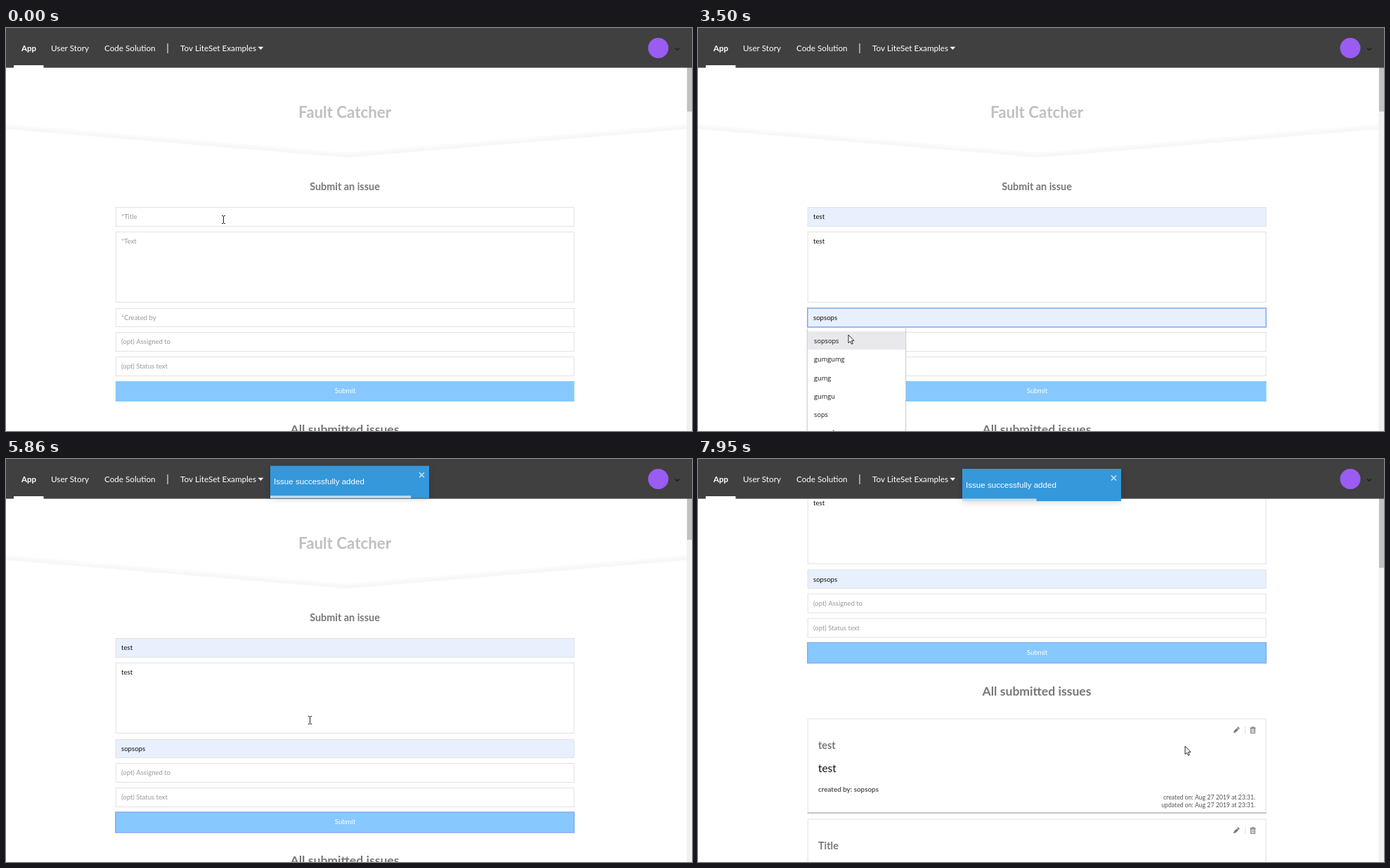
Recreate the animation shown at these times as an HTML page with a canvas. Size 976 by 574 pixels, loop 8 s.

```html
<!DOCTYPE html>
<html lang="en">
<head>
<meta charset="utf-8">
<title>Submit an issue</title>
<style>
  html, body { margin: 0; width: 100%; height: 100%; overflow: hidden; background: #fff; }
  canvas { display: block; width: 976px; height: 574px; }
</style>
</head>
<body>
<canvas id="stage" width="976" height="574"></canvas>
<script>
const ctx = document.getElementById('stage').getContext('2d');
const LOOP = 8000, W = 976, H = 574;
const LATO = 'Lato, sans-serif', OPEN = '"Open Sans", sans-serif', ARIAL = '"Liberation Sans", Arial, sans-serif';
const LEFT = 155.8, WIDTH = 652.8, MID = 482;
const USER = 'sopsops';

const FIELDS = {
  title:    { y: 255, h: 28,  hint: '*Title' },
  text:     { y: 290, h: 101, hint: '*Text' },
  created:  { y: 399, h: 27,  hint: '*Created by' },
  assigned: { y: 433, h: 28,  hint: '(opt) Assigned to' },
  status:   { y: 468, h: 28,  hint: '(opt) Status text' }
};

const MENUS = {
  title:   { open: 390,  hover: 620,  close: 1000, items: ['test', 'Title', 'gumg', 'gumgu', 'sops', 'gumsop'] },
  created: { open: 2700, hover: 3340, close: 3730, items: [USER, 'gumgumg', 'gumg', 'gumgu', 'sops', 'sopsofs'] }
};

const FOCUS = [[310, 'title'], [1400, 'text'], [2550, 'created'], [4450, 'submit']];
const KEYS = [1610, 1690, 1840, 1920];
const TOAST_AT = 5288;

// time, x, y
const POINTER = [
  [70, 309, 273], [310, 262, 271], [460, 258, 271], [780, 222, 304], [1229, 222, 304],
  [1230, 238, 317], [1400, 236, 322], [1840, 238, 325], [2390, 240, 402], [2560, 240, 411],
  [2800, 238, 412], [3300, 215, 438], [3500, 214, 437], [3730, 214, 437], [4120, 262, 470],
  [4420, 424, 514], [4620, 424, 512], [4840, 401.5, 465.5], [4990, 430, 382],
  [5140, 432, 372], [7250, 432, 372], [7480, 520, 400], [7720, 648, 424], [7950, 693, 409]
];
const SCROLL = [[6410, 0], [6480, 12], [6560, 47.7], [6790, 193], [6870, 229], [6940, 241.4]];
const BOUNCE = [[0, -2143], [450, 17.9], [562, -7.1], [675, 3.6], [750, 0]];

const linear = p => p;
const easeOut = p => 1 - (1 - p) ** 3;

// Value of one column of a key list at time t
function track(keys, t, col = 1, ease = linear) {
  if (t <= keys[0][0]) return keys[0][col];
  for (let i = 1; i < keys.length; i++) {
    const a = keys[i - 1], b = keys[i];
    if (t < b[0]) return a[col] + (b[col] - a[col]) * ease((t - a[0]) / (b[0] - a[0]));
  }
  return keys[keys.length - 1][col];
}

function box(x, y, w, h, fill) {
  ctx.fillStyle = fill;
  ctx.fillRect(x, y, w, h);
}

function frame(x, y, w, h, color, line = 1) {
  ctx.strokeStyle = color;
  ctx.lineWidth = line;
  ctx.strokeRect(x + line / 2, y + line / 2, w - line, h - line);
}

function shape(points, fill) {
  ctx.beginPath();
  points.forEach(([x, y]) => ctx.lineTo(x, y));
  ctx.closePath();
  ctx.fillStyle = fill;
  ctx.fill();
}

function label(str, x, y, size, color, { weight = 400, family = LATO, align = 'left' } = {}) {
  ctx.font = `${weight} ${size}px ${family}`;
  ctx.fillStyle = color;
  ctx.textAlign = align;
  ctx.fillText(str, x, y);
  return ctx.measureText(str).width;
}

function stateAt(t) {
  const s = { t, scroll: track(SCROLL, t), focus: null, menu: null, values: {} };
  for (const [at, name] of FOCUS) if (t >= at) s.focus = name;
  for (const name in MENUS) {
    const m = MENUS[name];
    if (t >= m.open && t < m.close) s.menu = name;
    if (t >= m.hover) s.values[name] = m.items[0];
  }
  s.values.text = 'test'.slice(0, KEYS.filter(k => t >= k).length);
  return s;
}

function focusRing(y, h) {
  frame(LEFT - 0.8, y - 0.8, WIDTH + 1.2, h + 1.6, '#86b0f3', 1.6);
}

function caretOn(s, name) {
  if (s.focus !== name || s.menu) return false;
  if (name === 'title') return s.t >= 1000;
  return name === 'text' && (s.t < 1920 || Math.floor((s.t - 1920) / 530) % 2 === 0);
}

function drawField(s, name) {
  const { y, h, hint } = FIELDS[name], value = s.values[name];
  const base = y + 17.4;
  box(LEFT, y, WIDTH, h, value && name !== 'text' ? '#e8f0fe' : '#fff');
  frame(LEFT, y, WIDTH, h, '#e2e2e2');
  if (s.focus === name) focusRing(y, h);
  const w = value ? label(value, 164, base, 9.6, '#111') : 0;
  if (!value) label(hint, 164, base, 9.5, '#999');
  if (caretOn(s, name)) box(Math.round(164 + w), y + 8, 1, 12, '#000');
}

// Soft grey band that darkens towards a V-shaped edge
function drawChevron() {
  ctx.lineWidth = 1;
  for (let d = -8; d <= 1; d++) {
    const a = d <= 0 ? 0.04 * (d + 9) / 9 : 0.015;
    ctx.strokeStyle = `rgba(0,0,0,${a})`;
    ctx.beginPath();
    ctx.moveTo(0, 143 + d);
    ctx.lineTo(484.5, 183.5 + d);
    ctx.lineTo(969, 143 + d);
    ctx.stroke();
  }
}

function drawIcons(y) {
  const grey = '#777';
  ctx.save();
  ctx.translate(766, y);
  ctx.rotate(-Math.PI / 4);
  box(-3.2, -1.6, 5.8, 3.2, grey);
  box(3.2, -1.6, 1.9, 3.2, grey);
  shape([[-3.2, -1.6], [-3.2, 1.6], [-5.8, 0]], grey);
  ctx.restore();

  box(778, y - 5, 1, 10, '#e2e2e2');

  box(785.2, y - 3.6, 8.4, 1.1, grey);
  box(787.6, y - 4.8, 3.6, 1.2, grey);
  frame(786, y - 2.8, 6.8, 7.6, grey, 1.1);
  box(788, y - 1, 0.8, 4, grey);
  box(790.1, y - 1, 0.8, 4, grey);
}

function drawCard(y, title, text) {
  box(LEFT, y, WIDTH, 135, '#fff');
  frame(LEFT, y, WIDTH, 135, '#e2e2e2');
  box(LEFT, y + 134, WIDTH, 1, '#999');
  drawIcons(y + 16.5);
  label(title, 171, y + 43.5, 14.4, '#777', { weight: 700 });
  label(text, 171, y + 76, 15.4, '#111');
  label('created by: ' + USER, 171, y + 104, 9.8, '#555', { weight: 700 });
  ['created', 'updated'].forEach((verb, i) =>
    label(verb + ' on: Aug 27 2019 at 23:31.', 793, y + 115 + 11 * i, 8.7, '#555', { align: 'right' }));
}

function drawMenu(name, hovered) {
  const f = FIELDS[name], items = MENUS[name].items, row = 26.1;
  const top = f.y + f.h + 2, h = row * items.length + 8;
  ctx.save();
  ctx.shadowColor = 'rgba(0,0,0,.22)';
  ctx.shadowBlur = 3;
  ctx.shadowOffsetY = 1;
  box(156, top, 139, h, '#fff');
  ctx.restore();
  box(155, top, 1, h, '#d2d2d2');
  box(295, top, 1, h, '#d2d2d2');
  items.forEach((item, i) => {
    const y = top + 4 + row * i;
    if (i === 0 && hovered) box(156, y, 139, row, '#e9e9ed');
    label(item, 165, y + 17.3, 9.2, '#111', { family: OPEN });
  });
}

function drawPage(s) {
  ctx.save();
  ctx.translate(0, -s.scroll);
  drawChevron();
  const centred = { weight: 700, align: 'center' };
  label('Fault Catcher', MID, 127.5, 22.3, '#c0c0c0', centred);
  label('Submit an issue', MID, 230.5, 14.4, '#777', centred);
  for (const name in FIELDS) drawField(s, name);

  box(LEFT, 503, WIDTH, 29, '#87c9ff');
  if (s.focus === 'submit') focusRing(503, 29);
  label('Submit', 482.5, 520.4, 9.6, '#fff', { align: 'center' });

  label('All submitted issues', MID, 578, 17.6, '#777', centred);
  drawCard(611, 'test', 'test');
  drawCard(754, 'Title', 'Text');

  if (s.menu) drawMenu(s.menu, s.t >= MENUS[s.menu].hover);
  ctx.restore();
}

function drawScrollbar(s) {
  box(968.4, 56, 7.6, H - 56, '#f1f1f1');
  const end = s.t < 5310 ? 119 : 115 + s.scroll * 0.1655;
  box(969, 56, 7, end - 56, '#c1c1c1');
}

function drawHeader() {
  box(0, 0, W, 56.6, '#404040');
  box(11, 53, 42.5, 4, '#fff');
  label('App', 22, 32.7, 11.5, '#fff', { weight: 700 });
  label('User Story', 64, 32.7, 11.7, '#fff');
  label('Code Solution', 140, 32.7, 11.7, '#fff');
  box(229.5, 22, 1, 14, '#fff');
  label('Tov LiteSet Examples', 248, 32.7, 11.7, '#fff');
  shape([[358.5, 26.7], [366.2, 26.7], [362.4, 31]], '#fff');

  ctx.beginPath();
  ctx.arc(928, 28.5, 14.5, 0, Math.PI * 2);
  ctx.fillStyle = '#9a5cf2';
  ctx.fill();

  ctx.strokeStyle = '#1c1c1c';
  ctx.lineWidth = 1.3;
  ctx.beginPath();
  ctx.moveTo(952, 28.5);
  ctx.lineTo(955, 31.3);
  ctx.lineTo(958, 28.5);
  ctx.stroke();
}

function drawToast(t) {
  const age = t - TOAST_AT;
  if (age <= 0) return;
  ctx.save();
  ctx.globalAlpha = easeOut(Math.min(1, age / 450));
  ctx.translate(376, 14 + track(BOUNCE, age, 1, easeOut));
  ctx.save();
  ctx.shadowColor = 'rgba(0,0,0,.16)';
  ctx.shadowBlur = 9;
  ctx.shadowOffsetY = 1.5;
  box(0, 0, 226, 46, '#3498db');
  ctx.restore();
  box(0, 42.5, 226 * (1 - age / 5000), 3.5, 'rgba(255,255,255,.7)');
  label('Issue successfully added', 5, 26.5, 11.6, '#fff', { family: ARIAL });
  ctx.strokeStyle = 'rgba(255,255,255,.75)';
  ctx.lineWidth = 1.5;
  ctx.beginPath();
  ctx.moveTo(212, 9.5);
  ctx.lineTo(219, 16.5);
  ctx.moveTo(219, 9.5);
  ctx.lineTo(212, 16.5);
  ctx.stroke();
  ctx.restore();
}

// True where the pointer is an I-beam: over inputs and the list heading
function overText(s, x, y) {
  const py = y + s.scroll;
  if (s.menu) {
    const f = FIELDS[s.menu];
    if (x < 296 && py > f.y + f.h) return false;
  }
  if (x > 405 && x < 559 && py > 560 && py < 585) return true;
  return Object.values(FIELDS).some(f => py >= f.y && py <= f.y + f.h);
}

function drawPointer(s) {
  const x = track(POINTER, s.t, 1), y = track(POINTER, s.t, 2);
  ctx.save();
  ctx.translate(Math.round(x), Math.round(y));
  if (overText(s, x, y)) {
    box(0, -5, 1, 10, '#222');
    for (const end of [-6, 5]) {
      box(-2, end, 2, 1, '#222');
      box(1, end, 2, 1, '#222');
    }
  } else {
    const arrow = [[0, 0], [0, 11.6], [2.7, 9.2], [4.5, 13.2], [6.3, 12.4], [4.6, 8.5], [8, 8.3]];
    shape(arrow, '#fff');
    ctx.strokeStyle = '#111';
    ctx.lineWidth = 0.9;
    ctx.stroke();
  }
  ctx.restore();
}

function draw(now) {
  const s = stateAt(now % LOOP);
  box(0, 0, W, H, '#fff');
  drawPage(s);
  drawScrollbar(s);
  drawHeader();
  drawToast(s.t);
  drawPointer(s);
}

const start = performance.now();
function tick() {
  draw(performance.now() - start);
  requestAnimationFrame(tick);
}
tick();
</script>
</body>
</html>
```
